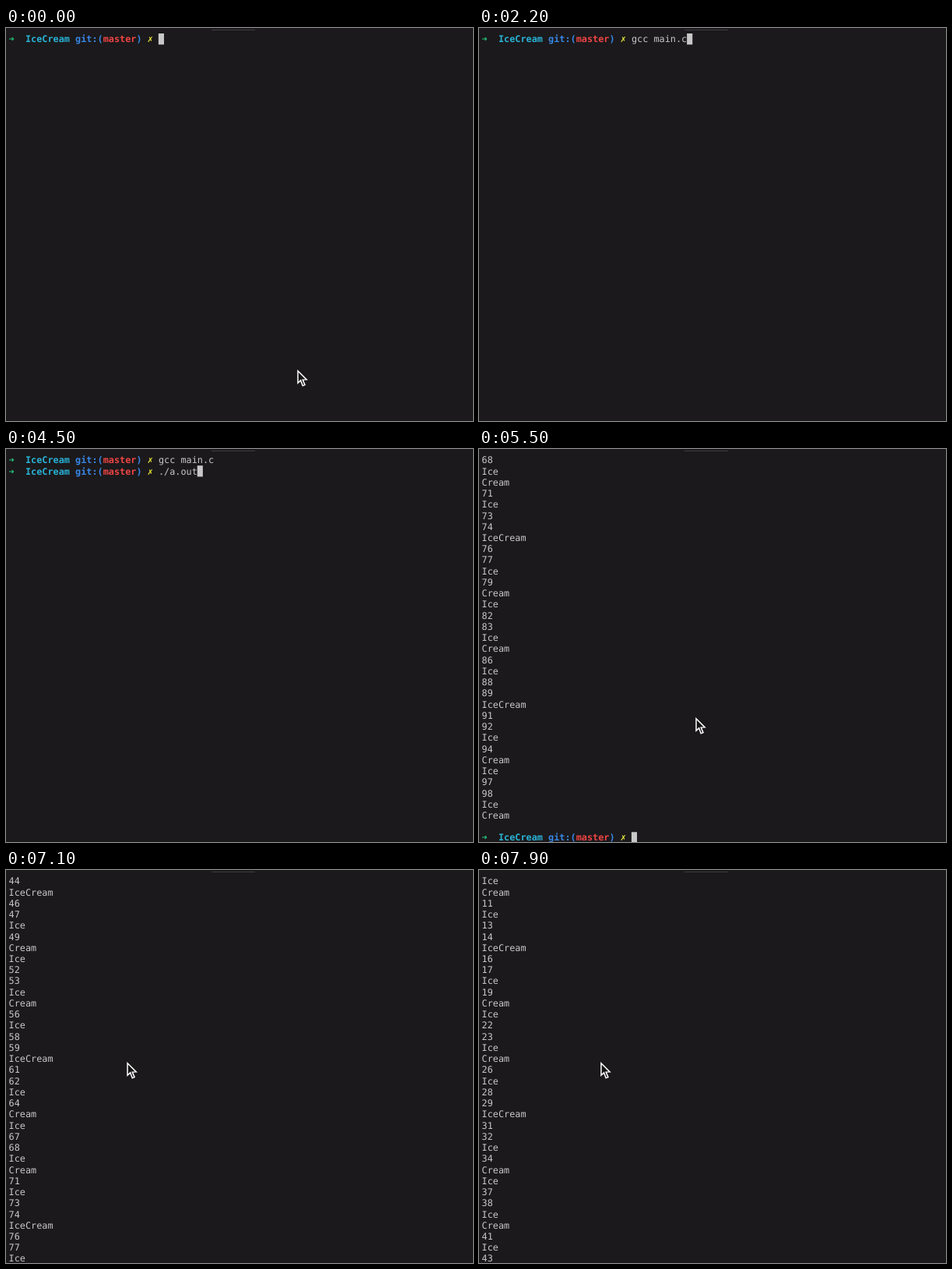
An HTML page with a canvas for the animation above (8000 ms loop, 600 by 504 pixels).

```html
<!DOCTYPE html>
<html lang="en">
<head>
<meta charset="utf-8">
<title>Terminal session</title>
<style>
html, body { margin: 0; width: 100%; height: 100%; overflow: hidden; background: #1b191b; }
canvas { display: block; width: 600px; height: 504px; }
</style>
</head>
<body>
<canvas id="stage" width="600" height="504"></canvas>
<script>
const ctx = document.getElementById('stage').getContext('2d');
const LOOP = 8000, TICK = 100;
const CELL_W = 7.125, CELL_H = 14.24, LEFT = 3.5, TOP = 7, BASE = 11.3;
const BG = '#1b191b', TEXT = '#c8c8c8';
const FONT = '11.83px "DejaVu Sans Mono", monospace';
const GREEN = '#23c57f', CYAN = '#29b2d6', BLUE = '#3787e6', RED = '#f04444', YELLOW = '#eeee3c';
const PROMPT = [['➜  ', GREEN], ['IceCream ', CYAN], ['git:(', BLUE], ['master', RED], [') ', BLUE], ['✗ ', YELLOW]];
const ROWS = 35, LAST = 100;

const BUILD_ENTER = 2900, BUILD_DONE = 3200, RUN_ENTER = 4700, RUN_DONE = 4900;
const HIDE = 800, SHOW = 5200;

// Bursts of typing; step is the time between keys.
const BUILD = [
  { at: 900, text: 'gc', step: 100 },
  { at: 1200, text: 'c main', step: 100 },
  { at: 1900, text: '.c', step: 300 }
];
const RUN = [
  { at: 3800, text: './', step: 200 },
  { at: 4300, text: 'a.out', step: 50 }
];

const SWIPES = [
  { from: 6150, to: 6750, rows: 24 },
  { from: 7080, to: 7650, rows: 35 }
];

const POINTER_PATH = [
  { t: 0, x: 374, y: 438 },
  { t: 200, x: 384, y: 375 },
  { t: 5200, x: 384, y: 375 },
  { t: 5300, x: 403, y: 365 },
  { t: 5500, x: 278, y: 344 },
  { t: 6000, x: 154, y: 246 },
  { t: LOOP, x: 156, y: 246 }
];

const progress = (t, from, to) => Math.min(1, Math.max(0, (t - from) / (to - from)));
const ease = p => p * p * p * (p * (6 * p - 15) + 10);
const mix = (a, b, p) => a + (b - a) * p;

function typed(bursts, t) {
  return bursts.map(({ at, text, step }) =>
    text.slice(0, Math.max(0, Math.floor((t - at) / step) + 1))).join('');
}

// Draws cell by cell and returns the column after the text.
function write(text, col, row, color = TEXT, bold = false) {
  ctx.font = (bold ? 'bold ' : '') + FONT;
  ctx.fillStyle = color;
  for (const ch of text) {
    ctx.fillText(ch, LEFT + col * CELL_W, TOP + row * CELL_H + BASE);
    col++;
  }
  return col;
}

function caret(col, row) {
  ctx.fillStyle = TEXT;
  ctx.fillRect(LEFT + col * CELL_W, TOP + row * CELL_H, CELL_W, CELL_H);
}

function prompt(row, command = '') {
  let col = 0;
  for (const [text, color] of PROMPT) col = write(text, col, row, color, true);
  return write(command, col, row);
}

function shell(t) {
  const buildEnd = prompt(0, typed(BUILD, t));
  if (t < BUILD_ENTER) return caret(buildEnd, 0);
  if (t < BUILD_DONE) return caret(0, 1);
  const runEnd = prompt(1, typed(RUN, t));
  if (t < RUN_ENTER) caret(runEnd, 1);
  else caret(0, 2);
}

function label(n) {
  return (n % 3 ? '' : 'Ice') + (n % 5 ? '' : 'Cream') || String(n);
}

function output(t) {
  const promptLine = LAST + 2;
  const scrolled = SWIPES.reduce((sum, s) => sum + s.rows * ease(progress(t, s.from, s.to)), 0);
  const first = promptLine - ROWS + 1 - Math.round(scrolled);
  for (let row = 0; row < ROWS; row++) {
    const n = first + row;
    if (n <= LAST) write(label(n), 0, row);
    else if (n === promptLine) caret(prompt(row), row);
  }
}

function drawPointer(t) {
  if (t >= HIDE && t < SHOW) return;
  const i = POINTER_PATH.findIndex(key => key.t > t);
  const a = POINTER_PATH[i - 1], b = POINTER_PATH[i];
  const p = progress(t, a.t, b.t);
  const x = mix(a.x, b.x, p), y = mix(a.y, b.y, p);
  const shape = [[1, 1.8], [1, 17.3], [4.6, 13.9], [7.2, 20.8], [10, 19.6], [7.2, 13.1], [12.1, 12.9]];
  ctx.beginPath();
  for (const [dx, dy] of shape) ctx.lineTo(x + dx, y + dy);
  ctx.closePath();
  ctx.fillStyle = '#151415';
  ctx.fill();
  ctx.strokeStyle = '#ffffff';
  ctx.lineWidth = 1.5;
  ctx.stroke();
}

function draw(t) {
  ctx.setTransform(1, 0, 0, 1, 0, 0);
  ctx.fillStyle = BG;
  ctx.fillRect(0, 0, 600, 504);
  ctx.fillStyle = '#3e3d3f';
  ctx.fillRect(264, 2, 56, 1);
  // An invisible skew keeps fractional baselines from snapping to whole pixels.
  ctx.setTransform(1, 1e-5, 1e-5, 1, 0, 0);
  if (t < RUN_DONE) shell(t);
  else output(t);
  drawPointer(t);
}

ctx.textRendering = 'geometricPrecision';
const start = performance.now();
function tick() {
  const t = (performance.now() - start) % LOOP;
  draw(Math.floor(t / TICK) * TICK);
  requestAnimationFrame(tick);
}
tick();
</script>
</body>
</html>
```
